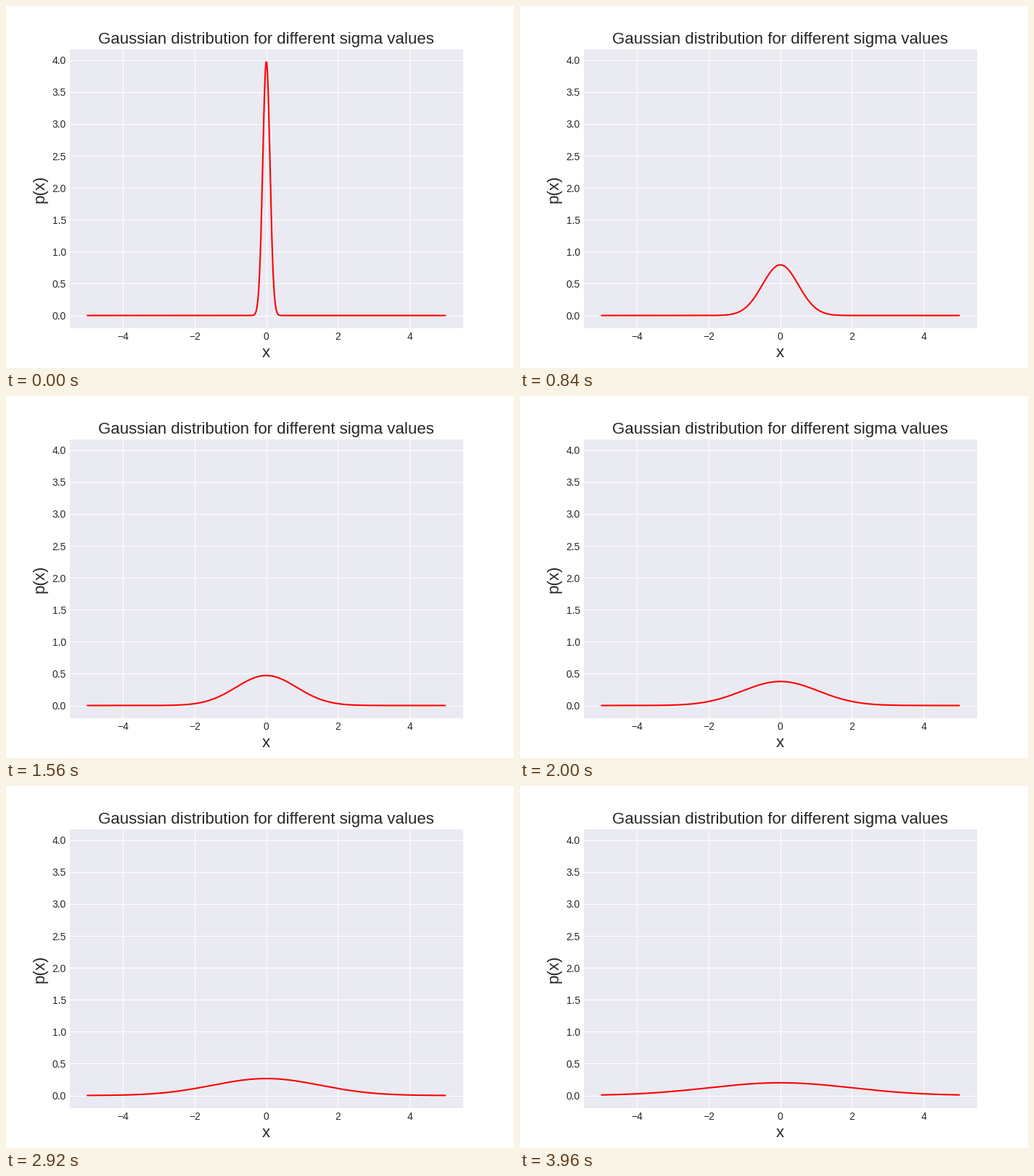
A matplotlib script that plays this animation: 700x500 px, repeating every 4000 ms.

```python
import numpy as np
import matplotlib.pyplot as plt
from matplotlib.animation import FuncAnimation

FRAMES = 100
INTERVAL = 40

plt.rcParams.update({
    "font.family": "Liberation Sans",
    "text.color": ".15",
    "axes.facecolor": "#EAEAF2",
    "axes.labelcolor": ".15",
    "axes.linewidth": 0,
    "axes.edgecolor": "white",
    "axes.axisbelow": True,
    "axes.grid": True,
    "grid.color": "white",
    "grid.linestyle": "-",
    "lines.solid_capstyle": "round",
    "xtick.color": ".15",
    "ytick.color": ".15",
    "xtick.major.size": 0,
    "ytick.major.size": 0,
})

x = np.linspace(-5, 5, 500)
sigmas = np.linspace(0.1, 2, FRAMES)


def gaussian(sigma):
    return np.exp(-x**2 / (2 * sigma**2)) / (sigma * np.sqrt(2 * np.pi))


fig, ax = plt.subplots(figsize=(7, 5), dpi=100)
fig.patch.set_facecolor("white")
line, = ax.plot(x, gaussian(sigmas[0]), color="red", lw=1.5)
ax.set_title("Gaussian distribution for different sigma values", fontsize=16)
ax.set_xlabel("x", fontsize=16)
ax.set_ylabel("p(x)", fontsize=16)


def update(i):
    line.set_ydata(gaussian(sigmas[i]))
    return line,


anim = FuncAnimation(fig, update, frames=FRAMES, interval=INTERVAL,
                     repeat=True, repeat_delay=0)
plt.show()
```
